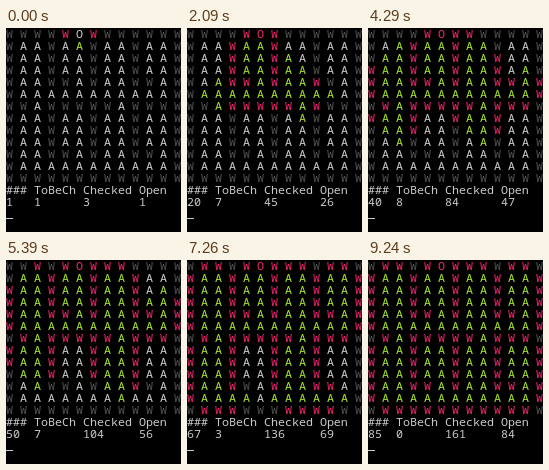
Write an HTML page that moves like this. It is 175 px wide and 204 px high and loops after 9.26 s.

```html
<!DOCTYPE html>
<html lang="en">
<head>
<meta charset="utf-8">
<title>Flood search</title>
<style>
  html, body { margin: 0; width: 100%; height: 100%; overflow: hidden; background: #000; }
  svg { display: block; width: 175px; height: 204px; }
  text { font: 11.667px "Noto Sans Mono", "DejaVu Sans Mono", monospace; white-space: pre; }
</style>
</head>
<body>
<svg id="stage" viewBox="0 0 175 204"><rect width="175" height="204"/></svg>
<script>
const CHAR = 7, LINE = 12, STEP = 110, SETTLED = 90, LOOP = 9260;
const GREY = '#cccccc', DIM = '#555555', GREEN = '#a6e22e', PINK = '#f92672';

const hall = 'WAAWAAWAAWAAW';
const niche = 'WAAWWAWAAWWAW';
const aisle = 'WAAAAAAAAAAAW';
const solid = 'W'.repeat(13);
const maze = [
  'WWWWWOWWWWWWW', hall, hall, hall, niche, aisle,
  'WWAWWWWWAWWWW', hall, hall, hall, niche, aisle, solid
];

const stage = document.getElementById('stage');

function add(name, attrs) {
  const node = document.createElementNS('http://www.w3.org/2000/svg', name);
  for (const key in attrs) node.setAttribute(key, attrs[key]);
  return stage.appendChild(node);
}

function write(col, row, content, fill = GREY) {
  const node = add('text', { x: col * CHAR, y: row * LINE + 10, fill });
  node.textContent = content;
  return node;
}

// Breadth-first search: remember when each cell is found and the totals per step.
function search() {
  const found = maze.map(row => Array(row.length).fill(Infinity));
  const queue = [[5, 0]], stats = [];
  let checked = 0, open = 0;
  while (queue.length) {
    const [x, y] = queue.shift();
    const step = stats.length + 1;
    for (const [dx, dy] of [[1, 0], [0, 1], [-1, 0], [0, -1]]) {
      const nx = x + dx, ny = y + dy;
      if (!maze[ny] || found[ny][nx] !== Infinity) continue;
      found[ny][nx] = step;
      checked++;
      if (maze[ny][nx] === 'A') {
        open++;
        queue.push([nx, ny]);
      }
    }
    stats.push([step, queue.length, checked, open]);
  }
  return { found, stats };
}

const { found, stats } = search();

const cells = maze.flatMap((row, y) => [...row].map((kind, x) => ({
  node: write(x * 2, y, kind),
  step: found[y][x],
  idle: kind === 'W' ? DIM : GREY,
  hit: kind === 'A' ? GREEN : PINK
})));

write(0, 13, '### ToBeCh Checked Open');
const values = [0, 4, 11, 19].map(col => write(col, 14, ''));
const cursor = add('rect', { x: 0, width: CHAR, height: 1, fill: GREY });

let shown = 0;

function draw(time) {
  const t = time % LOOP;
  const step = Math.min(Math.floor(t / STEP) + 1, stats.length);
  cursor.setAttribute('y', t % STEP < SETTLED ? 190 : 10);
  if (step === shown) return;
  shown = step;
  for (const c of cells) c.node.setAttribute('fill', c.step <= step ? c.hit : c.idle);
  values.forEach((node, i) => { node.textContent = stats[step - 1][i]; });
}

const start = performance.now();
function tick() {
  draw(performance.now() - start);
  requestAnimationFrame(tick);
}
tick();
</script>
</body>
</html>
```
